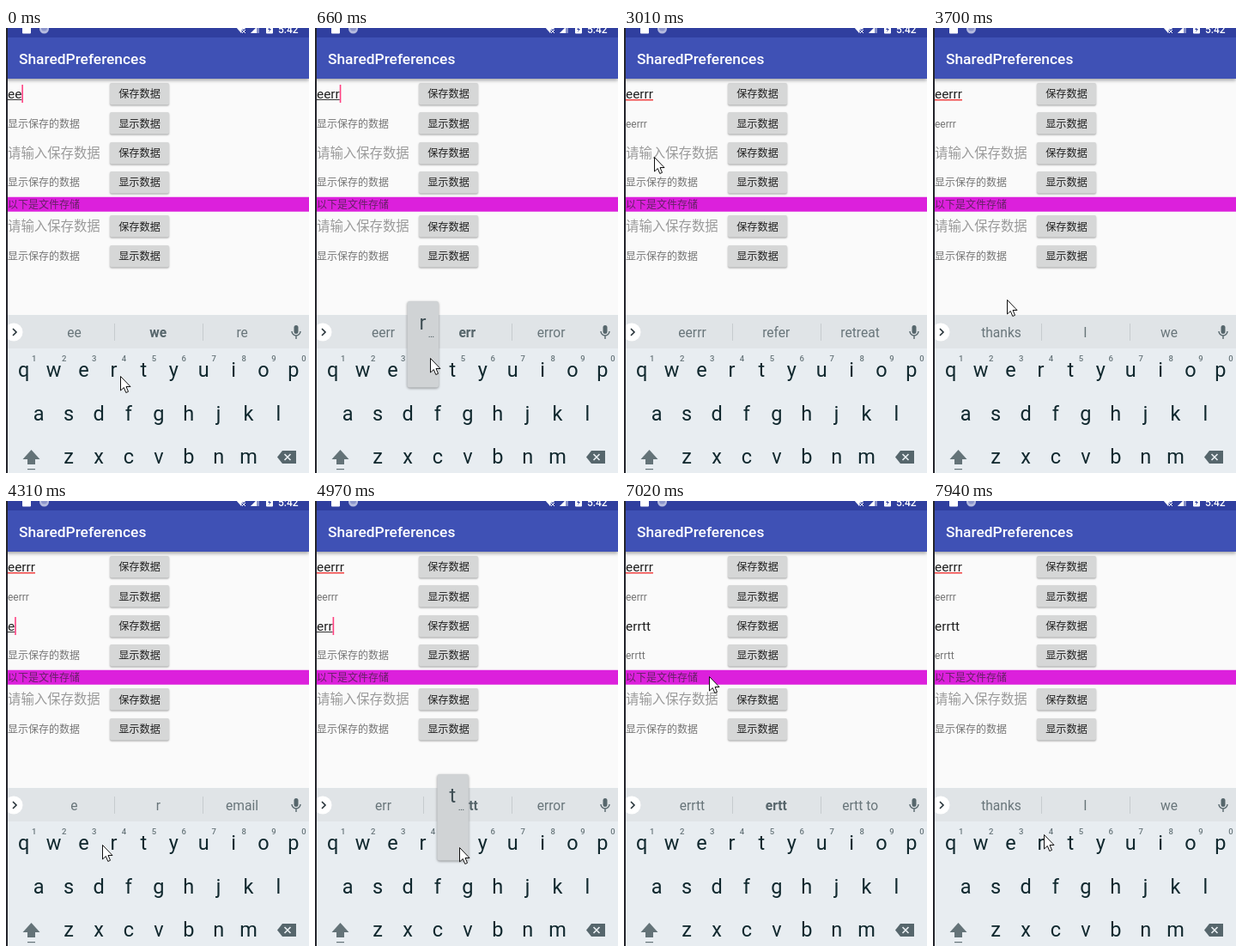
An HTML page with a canvas that plays this animation: 353 by 518 pixels, repeating every 8000 ms.

```html
<!DOCTYPE html>
<html lang="zh-CN">
<head>
<meta charset="utf-8">
<style>
html, body { margin: 0; width: 100%; height: 100%; overflow: hidden; background: #fafafa }
canvas { display: block }
</style>
</head>
<body>
<canvas id="stage" width="353" height="518"></canvas>
<script>
const g = document.getElementById('stage').getContext('2d');
const LOOP = 8000;
const FONT = 'Roboto, "Noto Sans CJK SC", "Noto Sans CJK", sans-serif';
const LETTERS = ['qwertyuiop', 'asdfghjkl', 'zxcvbnm'];
const HOLD = 150; // a key stays down this long before its letter appears
const EMPTY = '显示保存的数据';

// the pointer is sampled in bursts: first time, last time, samples
const BURSTS = [[0, 120, 2], [390, 970, 5], [1280, 2200, 8], [2350, 3310, 8], [3460, 3850, 4],
  [4160, 5130, 8], [5280, 6240, 8], [6360, 6360, 1], [6630, 7670, 9], [7820, 7940, 2]];
const SAMPLES = BURSTS.flatMap(([a, b, n]) =>
  Array.from({ length: n }, (_, i) => a + (b - a) * i / Math.max(1, n - 1)));

// pointer stops: time, x, y
const PATH = [[0, 133, 405], [660, 133, 405], [970, 150, 85], [1540, 149, 81], [2080, 152, 110],
  [2470, 152, 110], [3010, 35, 150], [3460, 33, 147], [3850, 112, 400], [4310, 112, 400],
  [4970, 168, 403], [5430, 168, 403], [5820, 158, 148], [6090, 160, 166], [6240, 158, 178],
  [6880, 158, 177], [7150, 45, 230], [7670, 139, 453], [7940, 129, 388]];

// key presses per field: time, letter
const TYPED = [
  [[-300, 'e'], [-150, 'e'], [-30, 'r'], [390, 'r'], [660, 'r']],
  [[4010, 'e'], [4430, 'r'], [4700, 'r'], [4970, 't'], [5280, 't']],
  []
];
const FOCUS = [0, 3310, 7280];            // when each field gets the caret
const TAPS = [1410, 2080, 5970, 6630];    // when each button is pressed
const SHOWN = [2350, 6760, Infinity];     // when each saved value appears

// second and third suggestion, * marks the bold one
const WORDS = {
  '': ['I', 'we'], ee: ['*we', 're'], eer: ['*err', 'ever'], eerr: ['*err', 'error'],
  eerrr: ['*ertt', 'retreat'], e: ['r', 'email'], er: ['*or', 'err'], err: ['*ertt', 'error'],
  errt: ['*ertt', 'error'], errtt: ['*ertt', 'ertt to']
};

const value = (i, t) => TYPED[i].filter(k => k[0] + HOLD <= t).map(k => k[1]).join('');
const focus = t => FOCUS.findLastIndex(f => f <= t);
const rowY = i => 76.6 + i * 34.4 + (i > 3 ? 16.8 : 0);
const keyX = i => 20.8 + i * 34.9;

function rect(x, y, w, h, color, r = 0) {
  g.fillStyle = color;
  g.beginPath();
  g.roundRect(x, y, w, h, r);
  g.fill();
}

function circle(x, y, r, color) {
  g.fillStyle = color;
  g.beginPath();
  g.arc(x, y, r, 0, 7);
  g.fill();
}

function shape(d, x, y, fill, stroke, width = 1) {
  const p = new Path2D(d);
  g.save();
  g.translate(x, y);
  if (fill) { g.fillStyle = fill; g.fill(p); }
  if (stroke) { g.strokeStyle = stroke; g.lineWidth = width; g.stroke(p); }
  g.restore();
}

function text(s, x, y, size, color, align = 'left', weight = 400) {
  g.font = `${weight} ${size}px ${FONT}`;
  g.textAlign = align;
  g.fillStyle = color;
  g.fillText(s, x, y);
}

function shadowed(blur, dy, alpha, draw) {
  g.save();
  g.shadowColor = `rgba(0,0,0,${alpha})`;
  g.shadowBlur = blur;
  g.shadowOffsetY = dy;
  draw();
  g.restore();
}

function bars() {
  shadowed(4, 1.5, .35, () => rect(0, 11, 353, 48, '#3f51b5'));
  rect(0, 0, 353, 11, '#303f9f');
  rect(19, -3, 10, 9.5, '#fff', 1);
  circle(44.5, 1, 5.5, '#b5bbdf');
  circle(44.5, 0, 3.5, '#8c95cb');
  shape('M0 0H12L6 7Z', 268, -1, '#fff');
  shape('M0 0l4 4m0 -4l-4 4', 275, 2, null, '#303f9f', 2.5);
  shape('M0 0l4 4m0 -4l-4 4', 275, 2, null, '#fff');
  shape('M0 7L10 -3V7Z', 285, -1, '#8790c8');
  shape('M0 7L7 0V7Z', 285, -1, '#fff');
  rect(303, -4, 8, 10.5, '#fff', 1);
  shape('M2 -2L-1 2H1L0 5L3 1H1Z', 306, 0, '#303f9f');
  text('5:42', 317, 6, 12, '#fff', 'left', 500);
  text('SharedPreferences', 15, 42, 17.35, '#fff', 'left', 500);
}

function field(i, t) {
  const y = Math.round(rowY(i * 2) + 5.2), s = value(i, t);
  text(s || '请输入保存数据', 2, y, 15.4, s ? '#212121' : '#9a9a9a');
  const width = s ? g.measureText(s).width : 0;
  if (t < SHOWN[i]) rect(2, y + 1, width, 1, '#333');
  else if (i === 0) rect(2, y + 1, width, 1.5, '#f04040');

  // solid while typing, then blinking
  const typing = TYPED[i].some(k => t >= k[0] && t < k[0] + HOLD + 400);
  const blink = (t + 800) % 1000 < 500;
  if (focus(t) === i && (typing || blink)) rect(2 + width, y - 16, 1.6, 21, '#ff4081');
}

function button(i, t) {
  const y = Math.round(rowY(i) - 12.8), down = t >= TAPS[i] && t < TAPS[i] + 270;
  shadowed(2, 1, .35, () => rect(121, y, 69, 25.5, down ? '#c6c6c6' : '#d6d7d7', 2));
  text(i % 2 ? '显示数据' : '保存数据', 155.5, rowY(i) + 4.5, 12.2, '#202020', 'center', 500);
}

function form(t) {
  rect(0, 196.8, 353, 16.9, '#dc20dc');
  text('以下是文件存储', 2, 209.5, 12, '#652065');
  for (let i = 0; i < 3; i++) {
    field(i, t);
    text(t < SHOWN[i] ? EMPTY : value(i, t), 2, rowY(i * 2 + 1) + 4.5, 12, '#757575');
  }
  for (let i = 0; i < 6; i++) button(i, t);
}

function suggestions(t) {
  const i = focus(t - HOLD), s = value(Math.max(0, i), t);
  const more = i < 1 && t >= SHOWN[0] ? ['refer', 'retreat'] : WORDS[s];
  [s || 'thanks', ...more].forEach((w, n) => {
    const bold = w[0] === '*';
    text(w.replace('*', ''), 79.5 + n * 97.8, 360, 15.6,
      bold ? '#56656b' : '#68757a', 'center', bold ? 700 : 400);
  });
}

function keyboard(t) {
  rect(0, 334, 353, 39, '#e0e4e7');
  rect(0, 373, 353, 145, '#e8edf1');
  circle(9, 354, 10.5, '#fff');
  shape('M0 0l4 4l-4 4', 8, 350, null, '#263238', 1.6);
  for (const x of [126, 229]) rect(x, 344, 1, 20, '#c6cbce');
  suggestions(t);
  rect(335.5, 346, 5, 10, '#56666c', 2.5);
  shape('M-5 -1a5 5 0 0 0 10 0M0 4v4', 338, 354, null, '#56666c', 1.4);

  LETTERS.forEach((line, row) => [...line].forEach((c, i) => {
    const x = keyX(i + [0, .5, 1.5][row]);
    text(c, x, 406 + row * 50.5, 23.5, '#10282e', 'center');
    if (!row) text((i + 1) % 10, x + 12, 388, 9.5, '#68767b', 'center', 500);
  }));
  shape('M0 -9L10 2H4.5V8H-4.5V2H-10Z', 29.5, 500, '#647378');
  rect(25, 513, 9, 1.2, '#647378');
  shape('M-11 0L-5 -7.5H11V7.5H-5Z', 327, 499.5, '#56666c');
  shape('M-3 -3.5l7 7m0 -7l-7 7', 327.5, 499.5, null, '#e8edf1', 1.7);
}

function popup(t) {
  const key = TYPED.flat().find(k => k[0] > 0 && t >= k[0] && t < k[0] + HOLD);
  if (!key) return;
  const x = keyX(LETTERS[0].indexOf(key[1]));
  shadowed(3, 1, .4, () => rect(x - 18, 318, 36.5, 100.5, '#d0d3d5', 3));
  text(key[1], x, 351, 23.5, '#3f4f55', 'center');
  text('…', x + 10, 360, 11, '#3f4f55', 'center');
}

function pointer(time) {
  const t = SAMPLES.findLast(s => s <= time + 30);
  const i = PATH.findLastIndex(p => p[0] <= t);
  const a = PATH[i], b = PATH[i + 1] || a;
  const k = b === a ? 0 : (t - a[0]) / (b[0] - a[0]);
  const mix = n => Math.round(a[n] + (b[n] - a[n]) * k) + .5;
  shape('M0 0V16.5L3.8 13L6.3 19L9 17.8L6.5 12H11.5Z', mix(1), mix(2), '#fff', '#111');
}

function draw(t) {
  rect(0, 0, 353, 518, '#fafafa');
  form(t);
  bars();
  keyboard(t);
  popup(t);
  rect(0, 0, 2, 518, '#24252c');
  pointer(t);
}

const start = performance.now();
function loop() {
  draw((performance.now() - start) % LOOP);
  requestAnimationFrame(loop);
}
loop();
</script>
</body>
</html>
```
